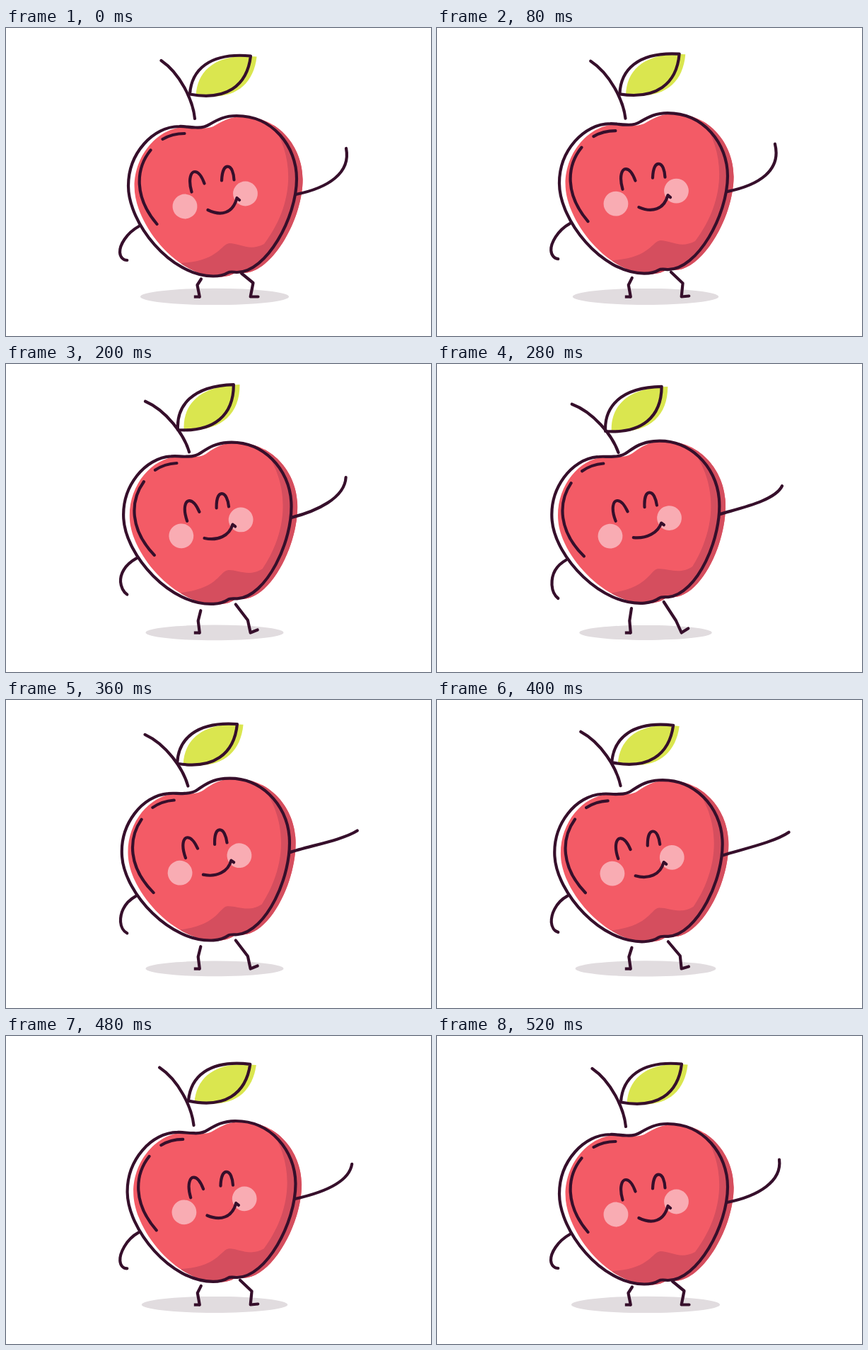
An HTML page that plays this animation: 601x435 px, repeating every 0.56 s.

```html
<!DOCTYPE html>
<html lang="en">
<head>
<meta charset="utf-8">
<title>Dancing apple</title>
<style>
  html, body { margin: 0; width: 100%; height: 100%; overflow: hidden; background: #fff; }
  svg { display: block; width: 601px; height: 435px; }
  .line { fill: none; stroke: #360f2b; stroke-width: 4.2; stroke-linecap: round; stroke-linejoin: round; }
</style>
</head>
<body>
<svg viewBox="0 0 601 435">
  <defs>
    <path id="skin" d="M268 140.5C258 140.5 254 138.6 245 139C208 139 173 177 173 223C173 275 232 350 293 350.5
      C303 350.5 310 348 314 345.5C317 343.5 323 345 327 345C368 345 411 268 411 213C411 167 377 124 326 124
      C310 124 300 129 288 136C282 140 275 141 268 140.5Z"/>
    <path id="blade" d="M0 0C2 -33.5 27 -59.5 86 -54C81 -11.5 51 9.5 0 0Z"/>
    <clipPath id="inside"><use href="#skin" x="8.6" y="1"/></clipPath>
  </defs>

  <ellipse id="shadow" cx="295" cy="379.4" fill="#e1dcdf"/>
  <path id="legL" class="line"/>
  <path class="line" d="M265.8 379.6H274" style="stroke-linecap:butt"/>
  <path id="legR" class="line"/>

  <g id="leaf">
    <use href="#blade" x="8.6" y="1" fill="#dae64f"/>
    <use href="#blade" class="line"/>
  </g>
  <path id="stem" class="line" d="M0 0C-2.5 -26 -21 -64 -47.5 -82"/>

  <g id="body">
    <use href="#skin" x="8.6" y="1" fill="#f35b66"/>
    <path clip-path="url(#inside)" fill="#d54e5e" d="M374 132C408 180 410 245 365 305C345 316 330 304 316 304
      C304 305 301 329 248 332L250 370H430V120Z"/>
    <g fill="#f9acb3">
      <circle cx="253" cy="252" r="17.4"/>
      <circle cx="338.5" cy="234" r="17.4"/>
    </g>
    <use href="#skin" class="line"/>
    <path class="line" d="M204.5 172.5C183 199 181 239 213.5 277M221.5 157Q235 149 252.5 149
      M262.5 231.5C257 212 262 203 267 203C272 203 277 210 280.5 219.5
      M305 215.5C305.5 202 309 195.7 313.5 195.7C319 195.7 322 205 322.5 214.5"/>
    <path id="mouth" class="line"/>
  </g>
  <path id="armL" class="line"/>
  <path id="armR" class="line"/>
</svg>

<script>
  const LOOP = 560, TICK = 40, REST = 40, DANCE = 480;
  const PIVOT = [317, 345];
  const { sin, cos, abs, max, floor, PI } = Math;

  const $ = id => document.getElementById(id);
  const set = (id, name, value) => $(id).setAttribute(name, value);

  function turn(x, y, deg) {
    const r = deg * PI / 180;
    return [x * cos(r) - y * sin(r), x * sin(r) + y * cos(r)];
  }

  function draw(ms) {
    const t = max(REST, floor(ms % LOOP / TICK) * TICK);
    const u = (t - REST) / DANCE, a = 2 * PI * u;
    const there = 1 - abs(2 * u - 1);            // linear out and back
    const mix = (from, to) => from + (to - from) * there;
    // Out to `far` and back; `lead` shifts the phase, `bulge` rounds the path
    const swing = (far, lead = 0, bulge = 0) =>
      far * (1 - cos(a)) / 2 + lead * sin(a) + bulge * sin(a) ** 2;

    const lift = -15 * sin(PI * u), tilt = swing(-5.1, .65);
    const onBody = (x, y) => {
      const [dx, dy] = turn(x - PIVOT[0], y - PIVOT[1], tilt);
      return [PIVOT[0] + dx, PIVOT[1] + dy + lift];
    };

    set('shadow', 'rx', mix(105, 93.7));
    set('shadow', 'ry', mix(11.7, 10.5));
    set('body', 'transform', `translate(0 ${lift}) rotate(${tilt} ${PIVOT})`);
    set('mouth', 'd', `M285.5 257C304 ${mix(266, 260.5)} 321 ${mix(262, 253)} 326.5 240L330 243`);

    // The stem bends most near its foot, where the leaf grows
    const stemX = 267 + swing(-10.5, 1, -1.2), stemY = 128 + swing(-3, 1.6, -3.8);
    const bend = swing(-13.8, -.6);
    const [jx, jy] = turn(-7, -34.5, bend * 1.45);
    set('stem', 'transform', `translate(${stemX} ${stemY}) rotate(${bend})`);
    set('leaf', 'transform', `translate(${stemX + jx} ${stemY + jy}) rotate(${swing(-6.3, -3.3, .9)})`);

    set('legL', 'd', `M${mix(276, 275)} ${mix(354.5, 345)}L${mix(270.5, 272.3)} ${mix(363, 362.5)}L273.8 379.6`);
    set('legR', 'd', `M${mix(333, 320.7)} ${mix(346.5, 336)}L${mix(349.5, 338)} ${mix(360, 362.5)}
      L345.7 379.5L${mix(356.5, 355.3)} ${mix(379.5, 373.5)}`);

    const [lx, ly] = onBody(188, 280);
    const ex = mix(161, 162.5), ey = 317 + swing(-5, -3.2, -3.7);
    const hy = 328 + swing(3, -2.2, -3.8), drop = (hy - ey - 11) / 2;
    set('armL', 'd', `M${lx} ${ly}C${lx - 18} ${ly + 10} ${ex - .5} ${ey - 10} ${ex} ${ey}
      C${ex + .5} ${ey + 7} 166 ${hy - drop} 171.3 ${hy}`);

    // The waving hand ends slightly past where it began
    const [rx, ry] = onBody(410, 235);
    const wx = 481 + swing(5.5, -8.8, 2.8) + 3 * u, wy = 170 + swing(0, -13.3) + 4.5 * u;
    set('armR', 'd', `M${rx} ${ry}C${rx + 45 + swing(-15, 4.9, -3.7)} ${ry - 9}
      ${488 + swing(-10, 2, -4)} ${205 + swing(-12, -4.9, -3)} ${wx} ${wy}`);
  }

  const begin = performance.now();
  function frame() {
    draw(performance.now() - begin);
    requestAnimationFrame(frame);
  }
  frame();
</script>
</body>
</html>
```
